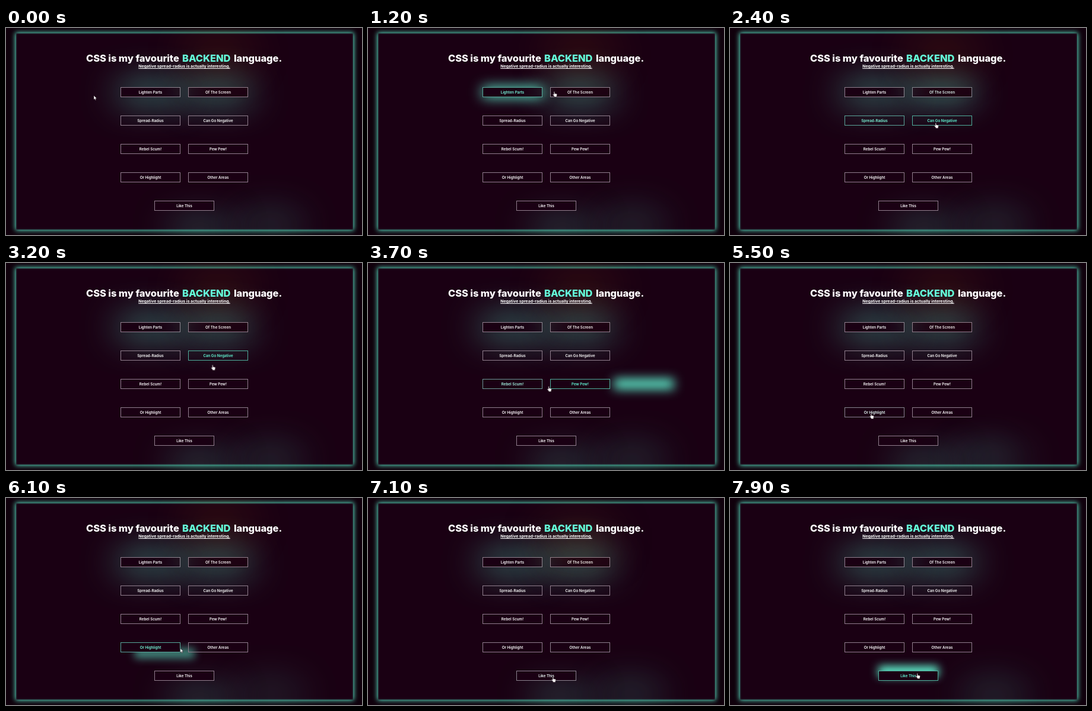
Animation, 600 px wide and 350 px high, one loop 8 s. Source, as an HTML page:

```html
<!DOCTYPE html>
<html lang="en">
<head>
<meta charset="utf-8">
<title>Negative spread-radius</title>
<style>
:root {
  --teal: #64ffda;
  --line: #917f8e;
  --lit-line: #4fae9c;
}
* { box-sizing: border-box; margin: 0; }
html, body { width: 100%; height: 100%; overflow: hidden; background: #10000c; }
#stage {
  position: relative; width: 600px; height: 350px; overflow: hidden;
  background: #10000c; color: #fff; font-family: Inter, sans-serif;
}
#panel {
  position: absolute; left: 17px; top: 9px; width: 568px; height: 332px;
  background: #1a0013;
  box-shadow: 0 0 8px 1px rgba(100, 255, 218, .9), inset 0 0 3px rgba(100, 255, 218, .35);
}
h1 span, h2 { position: absolute; z-index: 1; white-space: pre; }
h1 span { top: 41px; font-size: 16.5px; font-weight: 800; line-height: 20px; letter-spacing: -.08px; }
h1 .hot { color: var(--teal); }
h2 {
  top: 60px; left: 0; width: 601px; text-align: center;
  font-size: 6.85px; font-weight: 700; line-height: 10px;
  text-decoration: underline; text-decoration-thickness: 1px; text-underline-offset: 1px;
}

.btn {
  position: absolute; width: 101px; height: 17px;
  border: 1px solid var(--line); color: #fff;
  font-size: 6.2px; font-weight: 600; line-height: 15px; text-align: center; white-space: nowrap;
  box-shadow: var(--rest);
  animation: 8s infinite;
}
.l { left: 193px; }
.r { left: 307px; }
.r1 { top: 100px; }
.r2 { top: 148px; }
.r3 { top: 196px; }
.r4 { top: 244px; }

#lighten, #screen {
  --rest: 0 0 62px 2px rgba(100, 255, 218, .8);
  --lit: 0 0 16px 0 var(--teal);
}
#lighten { animation-name: lighten; }
#screen { animation-name: screen; }
#spread { animation-name: spread; }
#negative { animation-name: negative; }
#rebel { animation-name: rebel; }
#pew {
  --rest: 420px 0 110px -10px rgba(100, 255, 218, .5);
  animation-name: pew;
}
#highlight {
  --rest: 200px 85px 70px 0 rgba(100, 255, 218, .15);
  --lit: 0 0 6px 0 rgba(100, 255, 218, .6);
  animation-name: highlight;
}
#areas {
  --rest: 88px 80px 70px 0 rgba(100, 255, 218, .45);
  --lit: 0 0 6px 0 rgba(100, 255, 218, .6);
  animation-name: areas;
}
#like {
  --rest: 57px -255px 80px 0 rgba(255, 125, 0, .48), 27px 38px 60px 0 rgba(100, 255, 218, .55);
  --lit: 0 -6px 14px 0 var(--teal), 0 -2px 8px -3px rgba(100, 255, 218, .3);
  left: 250px; top: 292px;
  animation-name: like;
}

@keyframes lighten {
  0%, 5%, 25%, 100% { box-shadow: var(--rest); color: #fff; border-color: var(--line); }
  13.5% { box-shadow: var(--lit); color: var(--teal); border-color: var(--lit-line); }
}
@keyframes screen {
  0%, 14.5%, 36%, 100% { box-shadow: var(--rest); color: #fff; border-color: var(--line); }
  23%, 24% { box-shadow: var(--lit); color: var(--teal); border-color: var(--lit-line); }
}
@keyframes spread {
  0%, 24.5%, 36%, 100% { color: #fff; border-color: var(--line); }
  28%, 29% { color: var(--teal); border-color: var(--lit-line); }
}
@keyframes negative {
  0%, 27.5%, 46%, 100% { color: #fff; border-color: var(--line); }
  30%, 40% { color: var(--teal); border-color: var(--lit-line); }
}
@keyframes rebel {
  0%, 44%, 66%, 100% { color: #fff; border-color: var(--line); }
  51%, 57% { color: var(--teal); border-color: var(--lit-line); }
}
@keyframes pew {
  0%, 40.5%, 50%, 56%, 63%, 100% { box-shadow: var(--rest); }
  45% { box-shadow: 20px 0 16px 0 var(--teal); }
  46.25% { box-shadow: 107px 0 18px 0 rgba(100, 255, 218, .95); }
  57.5% { box-shadow: 242px 0 56px 3px rgba(100, 255, 218, .85); }
  60% { box-shadow: 70px 0 18px 0 var(--teal); }
  0%, 41%, 52%, 57.5%, 66%, 100% { color: #fff; border-color: var(--line); }
  45%, 47%, 61% { color: var(--teal); border-color: var(--lit-line); }
}
@keyframes highlight {
  0%, 68%, 86%, 100% { box-shadow: var(--rest); color: #fff; border-color: var(--line); }
  74%, 75% { box-shadow: var(--lit); color: var(--teal); border-color: var(--lit-line); }
}
@keyframes areas {
  0%, 77%, 90%, 100% { box-shadow: var(--rest); color: #fff; border-color: var(--line); }
  81%, 85% { box-shadow: var(--lit); color: var(--teal); border-color: var(--lit-line); }
}
@keyframes like {
  0%, 87.5% { box-shadow: var(--rest); color: #fff; border-color: var(--line); }
  100% { box-shadow: var(--lit); color: var(--teal); border-color: var(--lit-line); }
}

#cursor {
  position: absolute; z-index: 2; left: -6px; top: -6px; width: 12px; height: 12px; overflow: visible;
  animation: travel 8s linear infinite;
}
#cursor path { fill: #fff; stroke: #17000f; stroke-width: .5; stroke-linejoin: round; }
#arrow { animation: arrow 8s step-end infinite; }
#hand { animation: hand 8s step-end infinite; }
@keyframes arrow {
  0%, 24%, 40.3%, 63%, 75.8%, 85.5% { opacity: 1; }
  4.8%, 25.2%, 41.5%, 66.8%, 77.2%, 87.3% { opacity: 0; }
}
@keyframes hand {
  0%, 24%, 40.3%, 63%, 75.8%, 85.5% { opacity: 0; }
  4.8%, 25.2%, 41.5%, 66.8%, 77.2%, 87.3% { opacity: 1; }
}
@keyframes travel {
  0%, 1.25% { transform: translate(150px, 118px); }
  5% { transform: translate(200px, 112px); }
  11.25% { transform: translate(245px, 112px); }
  13% { transform: translate(255px, 112px); }
  15% { transform: translate(315px, 112px); }
  19%, 22.5% { transform: translate(350px, 113px); }
  25% { transform: translate(262px, 158px); }
  27% { transform: translate(255px, 162px); }
  30%, 39% { transform: translate(348px, 165px); }
  42% { transform: translate(352px, 200px); }
  43.5% { transform: translate(345px, 210px); }
  46.25% { transform: translate(306px, 213px); }
  49% { transform: translate(255px, 212px); }
  54% { transform: translate(262px, 211px); }
  57.5% { transform: translate(353px, 212px); }
  60% { transform: translate(358px, 212px); }
  62.5% { transform: translate(340px, 222px); }
  66% { transform: translate(262px, 252px); }
  68.75%, 73% { transform: translate(239px, 259px); }
  76.5% { transform: translate(300px, 258px); }
  79.5%, 84% { transform: translate(352px, 258px); }
  86.5% { transform: translate(335px, 285px); }
  88.75% { transform: translate(313px, 307px); }
  93% { transform: translate(315px, 305px); }
  98.75%, 100% { transform: translate(317px, 301px); }
}
</style>
</head>
<body>
<div id="stage">
  <div id="panel"></div>
  <h1><span style="left:135px">CSS is my favourite </span><span class="hot" style="left:297px">BACKEND</span><span style="left:384px">language.</span></h1>
  <h2>Negative spread-radius is actually interesting.</h2>

  <div class="btn l r1" id="lighten">Lighten Parts</div>
  <div class="btn r r1" id="screen">Of The Screen</div>
  <div class="btn l r2" id="spread">Spread-Radius</div>
  <div class="btn r r2" id="negative">Can Go Negative</div>
  <div class="btn l r3" id="rebel">Rebel Scum!</div>
  <div class="btn r r3" id="pew">Pew Pew!</div>
  <div class="btn l r4" id="highlight">Or Highlight</div>
  <div class="btn r r4" id="areas">Other Areas</div>
  <div class="btn" id="like">Like This</div>

  <svg id="cursor" viewBox="-6 -6 12 12">
    <path id="arrow" d="M-2-4V3.2L-.4 1.8.6 4.2 1.8 3.7.8 1.3H3Z"/>
    <path id="hand" d="M-1.9-4.2Q-1-5-.4-4.1V-1.3L2.7-.7Q3.6-.4 3.5.5L2.9 3.2V4.4H-1.3V3.4L-3.6.7Q-3.7-.4-2.6-.2L-1.9.5Z"/>
  </svg>
</div>
</body>
</html>
```
